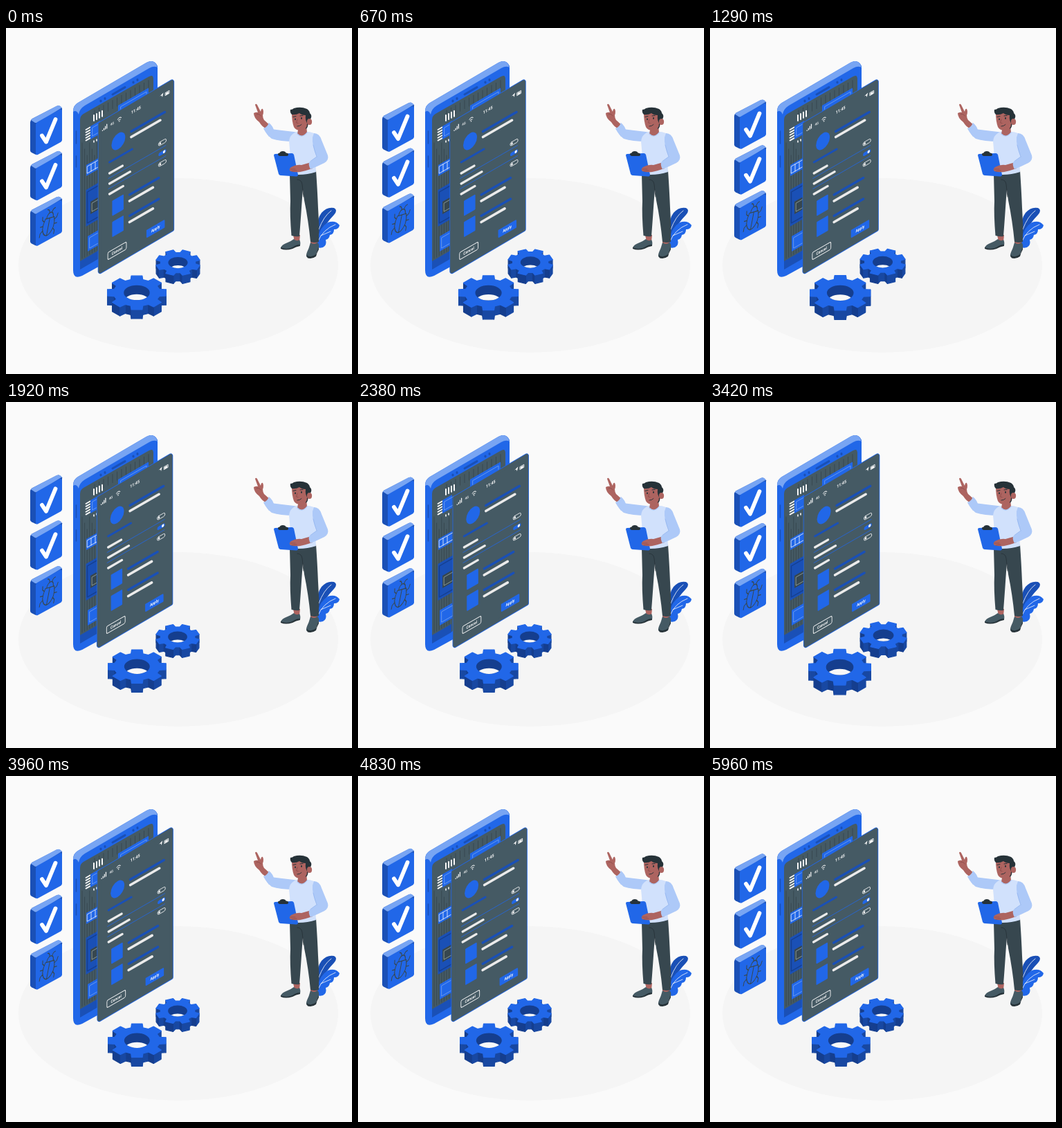
Write an HTML page that moves like this. It is 500 px wide and 500 px high and loops after 6000 ms.

```html
<!DOCTYPE html>
<html lang="en">
<head>
<meta charset="utf-8">
<title>App testing</title>
<style>
html, body { margin: 0; width: 100%; height: 100%; overflow: hidden; background: #fafafa; }
svg { display: block; width: 100vw; height: 100vh; }
text { font-family: Roboto, Arial, sans-serif; fill: #fafafa; text-anchor: middle; }
</style>
</head>
<body>
<svg id="stage" viewBox="0 0 500 500"></svg>
<script>
const BLUE = '#2167e8', LIGHT = '#78a5f3', DARK = '#1a50b6', NAVY = '#153e8e';
const SLATE = '#455a64', TRACE = '#37474f', INK = '#263238', PAPER = '#ebebeb', WHITE = '#fafafa';
const SKIN = '#ad6460', CREASE = '#8b4a49', SHIRT = '#d1e1fc', SLEEVE = '#adc9f8';
const SLOPE = 0.577;

// Drawing helpers
const shape = (d, fill, extra = '') => `<path d="${d}" fill="${fill}" ${extra}/>`;
const stroke = (d, color, width = 1) =>
  `<path d="${d}" fill="none" stroke="${color}" stroke-width="${width}" stroke-linecap="round" stroke-linejoin="round"/>`;
const oval = (x, y, rx, ry, fill, extra = '') =>
  `<ellipse cx="${x}" cy="${y}" rx="${rx}" ry="${ry}" fill="${fill}" ${extra}/>`;
const rise = (x, y, w) => `M${x} ${y}l${w} ${-w * SLOPE}`;
const bar = (x, y, w, color, width = 3.6) => stroke(rise(x, y, w), color, width);
const slab = (x, y, w, h) => `${rise(x, y, w)}v${h}l${-w} ${w * SLOPE}z`;
const iso = (x, y, content) => `<g transform="matrix(.866 -.5 0 1 ${x} ${y})">${content}</g>`;
const label = (x, y, size, words, weight = 500) =>
  iso(x, y, `<text font-size="${size}" font-weight="${weight}">${words}</text>`);
const range = n => [...Array(n).keys()];

function tile(y, mark) {
  return `<g transform="translate(0 ${y})">` +
    shape('M35 20Q35 17 38 15L73 -3Q76 -4.5 78 -3L81 0V46L43 67L37 64Q35 63 35 61Z', DARK) +
    shape('M36 17Q36 16 38 15L73 -3.3Q76 -4.6 78 -3.4L81 -1L46 21L42 21Z', LIGHT) +
    shape('M43 24Q43 21 46 19.5L77 2Q81 0 81 4V45Q81 48 78 49.5L46 67Q43 68.5 43 65Z', BLUE) +
    mark + '</g>';
}

function bug() {
  const legs = [-1, 1].map(s =>
    `M${s * 9} -3L${s * 13} -6L${s * 14} -11M${s * 10} 3H${s * 15}M${s * 9} 9L${s * 13} 13L${s * 13} 18` +
    `M${s * 2} -14Q${s * 3} -20 ${s * 7} -20`).join('');
  const body = 'M-6 -8Q-5 -15 0 -15Q5 -15 6 -8M-8 -7H8Q11 0 10 7Q7 17 0 18Q-7 17 -10 7Q-11 0 -8 -7ZM0 -7V18';
  return iso(62, 34, `<g transform="rotate(14) scale(.94)">${stroke(body + legs, TRACE, 1.3)}</g>`);
}

function phone() {
  const board = range(7).map(i =>
    stroke(`M${110 + i * 3.6} ${166 + i % 3 * 9}V${333 - i * 2}`, TRACE, 0.9)).join('') +
    range(13).map(i => stroke(`M${128 + i * 6.5} ${119 - i * 3.6}v12`, TRACE, 0.9)).join('');
  return shape('M97 120Q97 112 104 108L203 50Q214 44 219 55V298L110 358Q97 364 97 350Z', BLUE) +
    shape('M97 121Q97 112 104 108L203 50Q215 44 219 57Q214 54 207 58L114 112Q106 117 105 125Q102 118 97 121Z', LIGHT) +
    stroke('M101.5 149V167M101.5 185V201', DARK, 1.6) +
    shape('M107 133Q107 127 112 124L206 70.5Q213 66 213 74V288L107 348Z', SLATE) +
    board +
    shape(slab(107, 337, 28, 12), DARK) +
    oval(137, 105.5, 1.6, 1.9, DARK) + oval(143, 102, 1.6, 1.9, DARK) +
    bar(154, 96, 18, DARK, 3) +
    oval(184, 78.5, 1.6, 1.9, DARK) + oval(190, 75, 1.6, 1.9, DARK) +
    range(5).map(i => bar(115.5, 147 + i * 3.9, 6, WHITE, 1.8)).join('') +
    range(4).map(i => stroke(`M${127 + i * 4} ${126 - i * 2.1}v8`, WHITE, 2)).join('') +
    shape(slab(122, 142, 14, 19), BLUE) + stroke(slab(125, 144, 14, 12), LIGHT, 0.8) +
    stroke('M127 163v2M131 161v2', WHITE, 1.6) +
    shape(slab(116, 198, 20, 16), BLUE) + stroke(slab(117.5, 200, 20, 10), WHITE, 0.8) +
    stroke('M123 197v10M129 194v10', WHITE, 0.8) +
    shape(slab(115.5, 234, 22, 53), DARK) + stroke(slab(117.5, 237, 22, 45), NAVY, 1.4) +
    shape(slab(122, 251, 14, 18), TRACE) + stroke(slab(124.5, 253, 14, 12), '#9aa9a5', 0.8) +
    shape(slab(118, 301, 18, 22), BLUE) + stroke(slab(121, 303, 16, 15), LIGHT, 0.8) +
    shape(slab(162, 112, 44, 16), BLUE) + stroke(slab(166, 113.5, 37, 12), LIGHT, 0.8);
}

function toggle(x, y, on) {
  const pill = 'M-4 -2.5H4A2.5 2.5 0 0 1 4 2.5H-4A2.5 2.5 0 0 1 -4 -2.5Z';
  return iso(x, y, on
    ? shape(pill, BLUE) + oval(3, 0, 2, 2, WHITE)
    : stroke(pill, WHITE, 0.8) + oval(-3.6, 0, 1.6, 1.6, WHITE));
}

function card() {
  const frame = 'M136 138.7L240 77.5V291L136 352Z';
  return shape(frame, BLUE, `stroke="${BLUE}" stroke-width="6.4" stroke-linejoin="round"`) +
    shape(frame, SLATE, `stroke="${SLATE}" stroke-width="4.8" stroke-linejoin="round"`) +
    range(4).map(i => stroke(`M${139.5 + i * 2.1} ${148.5 - i * 1.2}v${-0.6 - i * 1.7}`, WHITE, 1.2)).join('') +
    label(153.5, 140, 5, '4G') +
    iso(164, 133, stroke('M-3.2 -2Q0 -5 3.2 -2M-1.8 0Q0 -1.6 1.8 0', WHITE, 0.9) + oval(0, 1.7, 0.8, 0.8, WHITE)) +
    label(188, 120.5, 6.2, '11:45', 700) +
    shape('M222.5 98.5L227.5 93.5L226 100L225 97.5Z', WHITE) +
    stroke(slab(230.5, 93.5, 5.5, 4), WHITE, 0.9) + shape(slab(231, 94, 4, 3), WHITE) +
    iso(162.5, 163.5, oval(0, 0, 11.5, 11.5, BLUE)) +
    bar(181, 149.5, 48.5, DARK) + bar(181, 157.5, 42, PAPER) +
    bar(149.5, 194, 33, DARK, 3) +
    bar(148, 217.5, 83, BLUE, 0.8) + bar(148, 232.5, 83, BLUE, 0.8) +
    [[210, 19], [225, 30], [240, 20]].map(([y, w], i) =>
      bar(149.5, y, w, PAPER, 3.2) + toggle(226, y - 44.8, i === 1)).join('') +
    [0, 30.5].map(y =>
      shape(slab(154, 250 + y, 15.5, 21), BLUE, `stroke="${BLUE}" stroke-linejoin="round"`) +
      bar(178.5, 241 + y, 42.5, DARK, 3.4) + bar(178.5, 250 + y, 34, PAPER)).join('') +
    shape(slab(204, 292.5, 24.5, 9.5), BLUE, `stroke="${BLUE}" stroke-width="2" stroke-linejoin="round"`) +
    label(216.2, 292, 5.8, 'Apply', 700) +
    iso(147.2, 324.5, `<rect width="31" height="10.5" rx="2" fill="none" stroke="${WHITE}"/>`) +
    label(160.5, 324, 5.8, 'Cancel', 700);
}

function gear(id, cx, cy, r, depth, turn) {
  const at = (radius, deg) => {
    const a = deg * Math.PI / 180;
    return [cx + radius * Math.cos(a), cy + radius * SLOPE * Math.sin(a)];
  };
  const rim = range(8).flatMap(k => {
    const a = k * 45 + turn;
    return [at(r * 0.77, a - 15), at(r - 0.7, a - 10.5), at(r - 0.7, a + 10.5), at(r * 0.77, a + 15)];
  });
  const walls = rim.map((p, i) => [p, rim[(i + 1) % rim.length]])
    .filter(([p, q]) => q[0] < p[0] + 0.4)
    .sort((m, n) => m[0][1] + m[1][1] - n[0][1] - n[1][1])
    .map(([p, q]) => {
      const color = q[1] < p[1] - 1 ? NAVY : '#1848a2';
      return shape(`M${p}L${q}v${depth}L${p[0]} ${p[1] + depth}Z`, color,
        `stroke="${color}" stroke-width="1.2" stroke-linejoin="round"`);
    }).join('');
  const hx = r * 0.43, hy = hx * SLOPE;
  const hole = `M${cx - hx} ${cy}a${hx} ${hy} 0 1 0 ${2 * hx} 0a${hx} ${hy} 0 1 0 ${-2 * hx} 0Z`;
  const face = `M${rim.join('L')}Z`;
  return `<clipPath id="${id}"><path d="${hole}"/></clipPath>` + walls +
    shape(face, BLUE, `stroke="${BLUE}" stroke-width="1.4" stroke-linejoin="round"`) +
    shape(hole, NAVY) +
    oval(cx, cy + depth, hx, hy, '#f8f8f8', `clip-path="url(#${id})"`);
}

function plant() {
  return shape('M450 292Q449 276 456 267Q464 258 474 260Q480 263 474 270Q464 280 452 300Z', DARK) +
    shape('M450 306Q453 288 465 281Q476 277 482 285Q481 291 474 291Q474 298 468 299Q467 305 462 306Q464 314 458 317Q452 319 448 316Z', BLUE) +
    stroke('M452 291Q459 272 470 264M451 308Q458 291 476 284M455 300Q462 297 469 294', WHITE, 0.8);
}

function person() {
  const legs =
    shape('M415 299L425 299L424 309L417 309Z', SKIN) + shape('M440 307L451 307L449 315L440 315Z', SKIN) +
    shape('M416 305Q412 308 407 310Q398 313 397 318Q405 321 414 318Q419 314 425 314Q426 309 424 306Q420 309 416 305Z', SLATE) +
    shape('M397 317Q405 321 414 317Q419 313 425 313V315Q419 316 414 319Q404 322 397 319Z', INK) +
    shape('M440 310Q438 318 435 324Q432 331 437 332Q445 333 448 328Q449 322 452 318Q453 312 450 310Q445 314 440 310Z', SLATE) +
    shape('M434 328Q441 333 448 327Q449 322 452 317V320Q449 325 448 330Q443 334 436 332.5Z', INK) +
    shape('M410 210L431 211L428 245Q426 275 424 301Q419 302 412.5 300Q410 270 411 250Z', TRACE) +
    shape('M422 211L448 206Q450 235 451 260Q453 285 452 309Q446 311 440 309Q437 278 431 249L427 219Z', TRACE) +
    stroke('M421 219Q427 219 428 226L430 244', INK, 0.8);
  const raisedArm =
    shape('M377 146Q370 143 366 136Q358 130 358 123Q362 121 364 122L360 111Q361 108.5 363 111L368 121Q369 116 371 117Q373 121 371 126Q371 130 373 133L383 142Z', SKIN) +
    stroke('M362 125Q366 123 368 127', CREASE, 0.8) +
    shape('M375 146Q379 141 380 136Q379 141 383 146Q398 148 416 150L427 152L417 164Q396 164 384 160Q377 155 372 145Z', SLEEVE) +
    shape('M372 145Q378 143 380 137Q385 141 387 147L380 157Z', SLEEVE);
  const torso =
    shape('M416 152Q421 148 427 150Q438 149 445 152Q452 160 449 180Q447 196 448 208Q430 214 409 211Q412 188 409 164Q410 155 416 152Z', SHIRT) +
    shape('M423 142L434 140L435 151Q428 160 421 153Z', SKIN) +
    stroke('M421 153Q428 160 435 151', SLEEVE, 1.2);
  const head =
    shape('M413 122Q424 115 436 122L437 138Q436 146 428 148Q419 149 416 143Q413 135 413 122Z', SKIN) +
    shape('M413 125Q410 122 411 118Q414 118 416 116Q426 113 435 117Q439 120 439 123Q443 126 440 132L436 139Q432 134 433 126Q427 126 424 123Q419 126 413 125Z', INK) +
    oval(438.5, 135.5, 3.6, 4.5, SKIN) +
    stroke('M435.5 139Q436 143 433.5 145', INK, 1.2) +
    stroke('M415 128.5L419 127.5M425 127L429 126.5', INK, 1) +
    oval(418, 131.8, 1, 1.4, INK) + oval(427, 130.5, 1, 1.4, INK) +
    stroke('M421 132L419.5 137L422 137.5', CREASE, 0.8) +
    stroke('M421 142Q425 142 427 139.5', INK, 0.9);
  const clipboard =
    shape('M387 184Q387 182 389 182L413 181Q415 181 416 183L422 212Q422 215 419 214.5L397 213Q395 213 394 211Z', BLUE) +
    shape('M393 182Q393 180.5 395.5 180.5Q396 178 400 178Q404 178 404.5 180.5Q408 180.5 408 183Q408 185 405 185L396 185Q393 185 393 182Z', INK);
  const foldedArm =
    shape('M441 194L427 198Q419 197 412 201Q408 204 411 207Q418 209 425 208Q431 207 443 203Z', SKIN) +
    stroke('M411 204L418 204M413 207L420 206', CREASE, 0.7) +
    shape('M445 152Q453 152 456 162L465 184Q467 191 460 195Q450 200 440 204Q437 199 438 194L449 186Q442 170 443 158Z', SLEEVE) +
    stroke('M449 186L440 192.5M449 186Q446 178 444 169', '#93b5ef', 0.8);
  return legs + raisedArm + torso + head + clipboard + foldedArm;
}

const check = stroke('M52 39.5L58 48.5L71.5 16', '#fff', 5.8);
document.getElementById('stage').innerHTML =
  oval(249, 343, 231, 126, '#f5f5f5') + plant() + person() + phone() +
  `<g id="card">${card()}</g>` +
  `<g id="tiles">${tile(116.3, check)}${tile(182.1, check)}${tile(247.9, bug())}</g>` +
  `<g id="gears">${gear('small', 248, 339.5, 32.3, 12, 22.5)}${gear('large', 189.3, 382.3, 43, 13, 0)}</g>`;

const [cardNode, tilesNode, gearsNode] = ['card', 'tiles', 'gears'].map(id => document.getElementById(id));

// Linear keyframes: [percent, value]
const FLOAT = [[0, 0], [50, -10], [100, 0]];
const BEAT = [[0, 1], [10, 1.1], [30, 1], [40, 1], [50, 1.1], [60, 1], [100, 1]];
const SHAKE = [[0, 0], [10, -1], [20, 2], [30, -4], [40, 4], [50, -4], [60, 4], [70, -4], [80, 2], [90, -1], [100, 0]];

function tween(keys, time, period) {
  const p = time % period / period * 100;
  const i = keys.findIndex(k => k[0] > p);
  const [a, from] = keys[i - 1], [b, to] = keys[i];
  return from + (to - from) * (p - a) / (b - a);
}

const LOOP = 6000, STEP = 1000 / 24;

function render(ms) {
  const time = (Math.floor((ms % LOOP + 10) / STEP) + 1) * STEP % LOOP;
  const scale = tween(BEAT, time, 3000);
  tilesNode.setAttribute('transform', `translate(0 ${tween(FLOAT, time, 3000)})`);
  cardNode.setAttribute('transform', `translate(${tween(SHAKE, time, LOOP)} 0)`);
  gearsNode.setAttribute('transform', `translate(213.3 370.5) scale(${scale}) translate(-213.3 -370.5)`);
}

const start = performance.now();
function tick() {
  render(performance.now() - start);
  requestAnimationFrame(tick);
}
tick();
</script>
</body>
</html>
```
